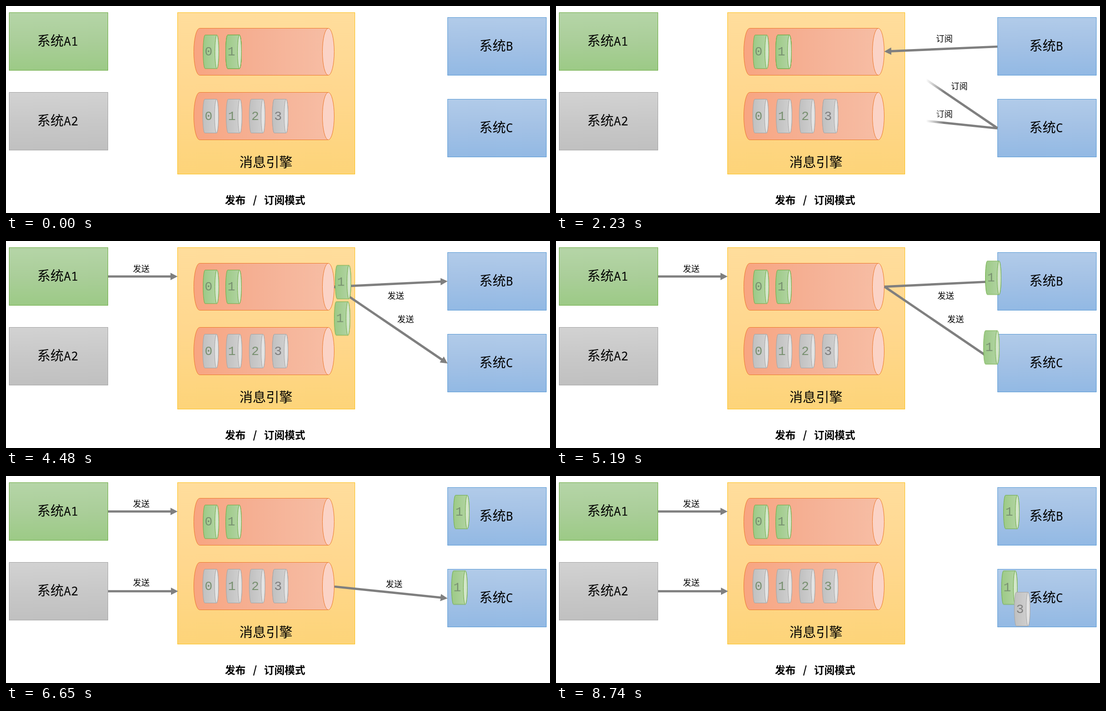
An HTML page for the animation above (9430 ms loop, 1108 by 423 pixels).

```html
<!DOCTYPE html>
<html lang="zh-CN">
<head>
<meta charset="utf-8">
<title>发布 / 订阅模式</title>
<style>
@property --edge { syntax: "<length>"; inherits: false; initial-value: 0px; }
html, body { margin: 0; width: 100%; height: 100%; overflow: hidden; background: #fff; }
svg { position: absolute; left: 0; top: 0; width: 1108px; height: 423px; }
text { font-family: "Noto Sans CJK SC", "Noto Sans CJK", sans-serif; fill: #000; }
.name { font-size: 27px; }
.name tspan { font-family: "Noto Sans Mono", monospace; font-size: 24.7px; }
.title { font-size: 21px; font-weight: 700; }
.label { font-size: 17px; }
.digit { font: 26px "Liberation Mono", monospace; fill: #789070; text-anchor: middle; }
.grey-digit { fill: #7f7f7f; }
.arrow { stroke: #7f7f7f; stroke-width: 4.7; marker-end: url(#head); }
.green { fill: url(#green); stroke: #70ad47; }
.grey { fill: url(#grey); stroke: #a5a5a5; }
.blue { fill: url(#blue); stroke: #5b9bd5; }
.gold { fill: url(#gold); stroke: #fcc221; }
.pipe { fill: url(#pipe); stroke: #ed7d31; }
.pipe-cap { fill: #fbd3c6; stroke: #ed7d31; }

/* soft-edged wipes: --edge is the leading edge, --soft the width of the fade */
.wipe {
  --dir: to right;
  --soft: 36px;
  -webkit-mask-image: linear-gradient(var(--dir), #000 calc(var(--edge) - var(--soft)), transparent var(--edge));
  mask-image: linear-gradient(var(--dir), #000 calc(var(--edge) - var(--soft)), transparent var(--edge));
}
.wipe, .move { animation: 9430ms linear infinite; }
.subscribe { --dir: to left; }
.publish { --soft: 22px; }
#subB { animation-name: subB; }
#subC { animation-name: subC; }
#pub1 { animation-name: pub1; }
#pub2 { animation-name: pub2; }
#send1 { animation-name: send1; }
#send2 { animation-name: send2; }
@keyframes subB {
  0%, 8.484% { --edge: 207px; opacity: 1; }
  18.24%, 28.419% { --edge: 475px; opacity: 1; }
  28.42%, 100% { --edge: 475px; opacity: 0; }
}
@keyframes subC {
  0%, 18.24% { --edge: 207px; opacity: 1; }
  28.102%, 28.419% { --edge: 475px; opacity: 1; }
  28.42%, 100% { --edge: 475px; opacity: 0; }
}
@keyframes pub1 {
  0%, 28.632% { --edge: 207px; }
  33.51%, 100% { --edge: 373px; }
}
@keyframes send1 {
  0%, 33.51% { --edge: 668px; opacity: 1; }
  38.6%, 59.914% { --edge: 937px; opacity: 1; }
  59.915%, 100% { --edge: 937px; opacity: 0; }
}
@keyframes pub2 {
  0%, 60.551% { --edge: 207px; }
  65.429%, 100% { --edge: 373px; }
}
@keyframes send2 {
  0%, 65.429% { --edge: 668px; opacity: 1; }
  70.414%, 92.629% { --edge: 937px; opacity: 1; }
  92.63%, 100% { --edge: 937px; opacity: 0; }
}

/* constant acceleration to the midpoint, then constant braking */
.move {
  --speed-up: cubic-bezier(.3333, 0, .6667, .3333);
  --slow-down: cubic-bezier(.3333, .6667, .6667, 1);
}
.first { animation-name: first; }
.second { animation-name: second; }
#toB { --dx: 464px; --dy: -20px; }
#toC { --dx: 460px; --dy: 134.5px; }
#third { --dx: 391px; --dy: 47px; animation-name: third; }
#toB, #toC { animation-name: copies; }
@keyframes copies {
  0% { transform: translate(0, 0); }
  40.339% { transform: translate(0, 0); animation-timing-function: var(--speed-up); }
  49.883% { transform: translate(calc(var(--dx) / 2), calc(var(--dy) / 2)); animation-timing-function: var(--slow-down); }
  59.427%, 100% { transform: translate(var(--dx), var(--dy)); }
}
@keyframes third {
  0% { transform: translate(0, 0); }
  71.601% { transform: translate(0, 0); animation-timing-function: var(--speed-up); }
  81.676% { transform: translate(calc(var(--dx) / 2), calc(var(--dy) / 2)); animation-timing-function: var(--slow-down); }
  91.75%, 100% { transform: translate(var(--dx), var(--dy)); }
}
</style>
</head>
<body>
<svg viewBox="0 0 1108 423">
  <defs>
    <linearGradient id="green" x2="0" y2="1"><stop stop-color="#b5d5a7"/><stop offset=".5" stop-color="#aace99"/><stop offset="1" stop-color="#9cca86"/></linearGradient>
    <linearGradient id="grey" x2="0" y2="1"><stop stop-color="#d2d2d2"/><stop offset=".5" stop-color="#c8c8c8"/><stop offset="1" stop-color="#c0c0c0"/></linearGradient>
    <linearGradient id="blue" x2="0" y2="1"><stop stop-color="#b1cbe9"/><stop offset=".5" stop-color="#a3c1e5"/><stop offset="1" stop-color="#92b9e4"/></linearGradient>
    <linearGradient id="gold" x2="0" y2="1"><stop stop-color="#ffdd9c"/><stop offset=".5" stop-color="#ffd78e"/><stop offset="1" stop-color="#fdd479"/></linearGradient>
    <linearGradient id="pipe"><stop stop-color="#f8a581"/><stop offset=".5" stop-color="#f5b195"/><stop offset="1" stop-color="#f7bda4"/></linearGradient>
    <linearGradient id="greenSide"><stop stop-color="#9cca86"/><stop offset="1" stop-color="#b5d5a7"/></linearGradient>
    <linearGradient id="greySide"><stop stop-color="#c0c0c0"/><stop offset="1" stop-color="#d2d2d2"/></linearGradient>
    <marker id="head" markerUnits="userSpaceOnUse" markerWidth="16" markerHeight="16" refX="1" refY="8" orient="auto">
      <path d="M0 .5L14.5 8L0 15.5Z" fill="#7f7f7f"/>
    </marker>
    <g id="greenChip" stroke="#70ad47">
      <path d="M4 0H28A4 34.3 0 0 1 28 68.6H4A4 34.3 0 0 1 4 0Z" fill="url(#greenSide)"/>
      <ellipse cx="28" cy="34.3" rx="4" ry="34.3" fill="#d3e6ca"/>
    </g>
    <g id="greyChip" stroke="#a5a5a5">
      <path d="M4 0H28A4 34.5 0 0 1 28 69H4A4 34.5 0 0 1 4 0Z" fill="url(#greySide)"/>
      <ellipse cx="28" cy="34.5" rx="4" ry="34.5" fill="#e3e3e3"/>
    </g>
  </defs>

  <rect class="green" x="6.5" y="13.5" width="201" height="118"/>
  <rect class="grey" x="6.5" y="176.5" width="201" height="118"/>
  <rect class="gold" x="349.5" y="13.5" width="361" height="330"/>
  <rect class="blue" x="899.5" y="23.5" width="201" height="118"/>
  <rect class="blue" x="899.5" y="190.5" width="201" height="118"/>

  <path class="pipe" d="M394.5 45.5H656.5V141.5H394.5A12 48 0 0 1 394.5 45.5Z"/>
  <ellipse class="pipe-cap" cx="656.5" cy="93.5" rx="12" ry="48"/>
  <path class="pipe" d="M394.5 176.5H656.5V273.5H394.5A12 48.5 0 0 1 394.5 176.5Z"/>
  <ellipse class="pipe-cap" cx="656.5" cy="225" rx="12" ry="48.5"/>

  <use href="#greenChip" x="401.5" y="59.3"/><text class="digit" x="412.5" y="101">0</text>
  <use href="#greenChip" x="447.5" y="59.3"/><text class="digit" x="459" y="101">1</text>
  <use href="#greyChip" x="400.8" y="190.5"/><text class="digit" x="412.5" y="233">0</text>
  <use href="#greyChip" x="448.5" y="190.5"/><text class="digit" x="460" y="233">1</text>
  <use href="#greyChip" x="495.5" y="190.5"/><text class="digit" x="507.5" y="233">2</text>
  <use href="#greyChip" x="542.5" y="190.5"/><text class="digit" x="554" y="233">3</text>

  <text class="name" x="63.5" y="81">系统<tspan>A1</tspan></text>
  <text class="name" x="63.5" y="244">系统<tspan>A2</tspan></text>
  <text class="name" x="964" y="91">系统<tspan>B</tspan></text>
  <text class="name" x="964" y="258">系统<tspan>C</tspan></text>
  <text class="name" x="475.5" y="329">消息引擎</text>
  <text class="title" x="446" y="403.5">发布</text>
  <text class="title" x="507" y="403.5" text-anchor="middle">/</text>
  <text class="title" x="525.5" y="403.5">订阅模式</text>
</svg>

<svg id="subB" class="wipe subscribe" viewBox="0 0 1108 423">
  <path class="arrow" d="M899 83L682 92.4"/>
  <text class="label" x="774" y="73">订阅</text>
</svg>
<svg id="subC" class="wipe subscribe" viewBox="0 0 1108 423">
  <path class="arrow" d="M899 249.5L679.8 100.3"/>
  <path class="arrow" d="M899 250L682 227.3"/>
  <text class="label" x="804.5" y="170">订阅</text>
  <text class="label" x="774" y="227">订阅</text>
</svg>
<svg id="pub1" class="wipe publish" viewBox="0 0 1108 423">
  <path class="arrow" d="M208 72.5H336"/>
  <text class="label" x="258.5" y="62.5">发送</text>
</svg>
<svg id="send1" class="wipe" viewBox="0 0 1108 423">
  <path class="arrow" d="M669 93.3L886 83"/>
  <path class="arrow" d="M669 93.3L888.3 242.7"/>
  <text class="label" x="777" y="118">发送</text>
  <text class="label" x="797" y="166">发送</text>
</svg>
<svg id="pub2" class="wipe publish" viewBox="0 0 1108 423">
  <path class="arrow" d="M208 235.5H337"/>
  <text class="label" x="258.5" y="224">发送</text>
</svg>
<svg id="send2" class="wipe" viewBox="0 0 1108 423">
  <path class="arrow" d="M669 226L886 248.5"/>
  <text class="label" x="773.5" y="227">发送</text>
</svg>

<svg viewBox="0 0 1108 423">
  <g id="toB" class="move"><use href="#greenChip" x="447.5" y="59.3"/><text class="digit" x="459" y="101">1</text></g>
  <g id="toC" class="move"><use href="#greenChip" x="447.5" y="59.3"/><text class="digit" x="459" y="101">1</text></g>
  <g id="third" class="move"><use href="#greyChip" x="542.5" y="190.5"/><text class="digit grey-digit" x="554" y="233">3</text></g>
</svg>
</body>
</html>
```
